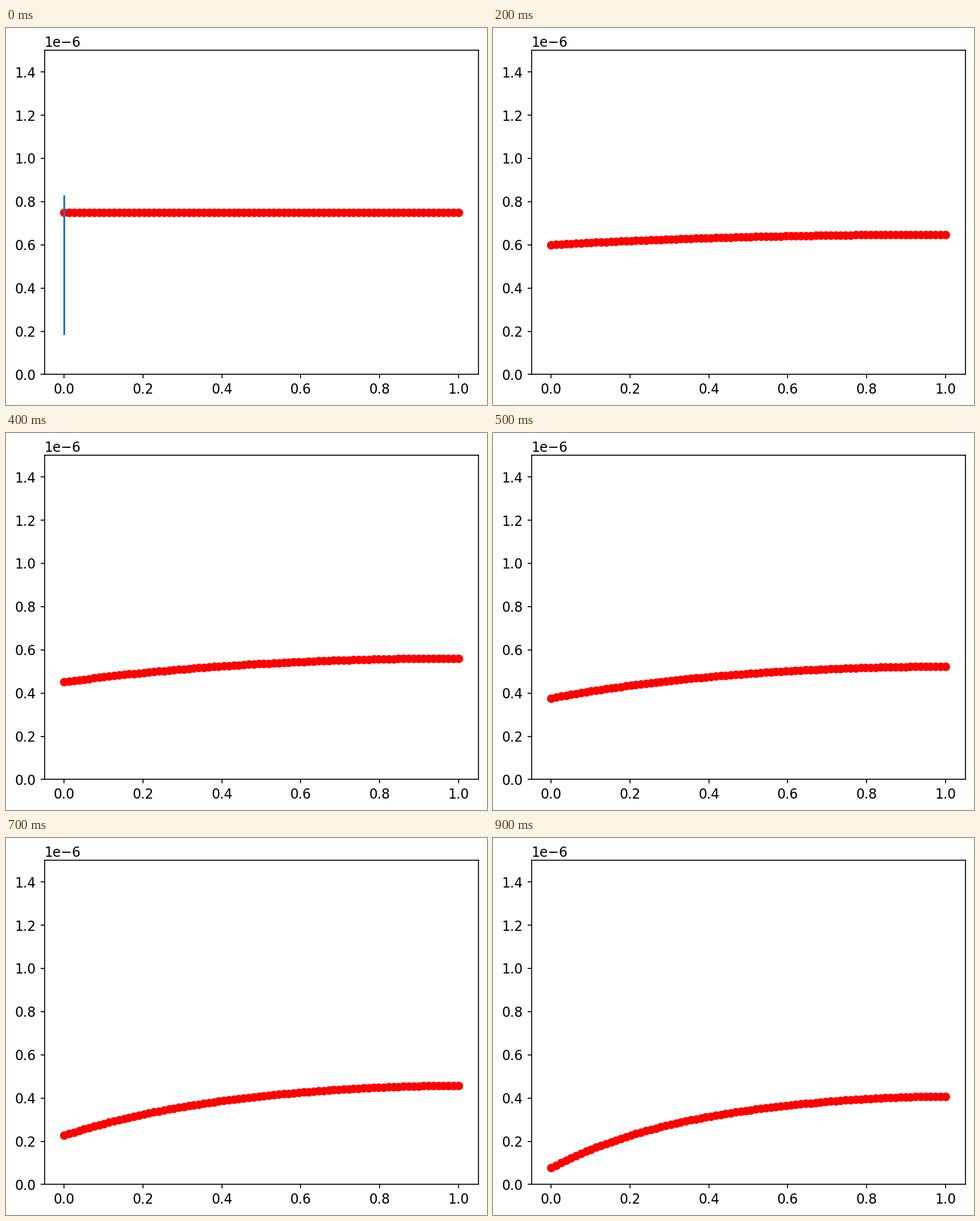
These frames come from a looping animation (846x662 px, 1 s). A matplotlib script:

```python
import numpy as np
import matplotlib.pyplot as plt
from matplotlib.animation import FuncAnimation

WIDTH, HEIGHT, DPI = 846, 662, 154
LEFT, RIGHT, TOP, BOTTOM = 67.5, 830.5, 39.2, 608.5  # axes edges in pixels
FRAMES, INTERVAL = 10, 100
SCALE = 1e-6

plt.rcParams.update({"font.family": "DejaVu Sans", "font.size": 11})

fig = plt.figure(figsize=((WIDTH + 1e-6) / DPI, (HEIGHT + 1e-6) / DPI), dpi=DPI)
ax = fig.add_axes([LEFT / WIDTH, 1 - BOTTOM / HEIGHT,
                   (RIGHT - LEFT) / WIDTH, (BOTTOM - TOP) / HEIGHT])
ax.set_xlim(-0.05, 1.05)
ax.set_ylim(0, 1.5 * SCALE)

x = np.linspace(0, 1, 80)
dots, = ax.plot(x, np.full_like(x, 0.75 * SCALE), "ro")
bar, = ax.plot([0, 0], [0.188 * SCALE, 0.825 * SCALE], color="C0")


def profile(step):
    """Film height: the left end thins steadily, the right end slows down."""
    left = 0.75 - 0.0747 * step
    right = 0.75 - 0.0546 * step + 0.00184 * step**2
    bulge = 0.15 + 0.009 * step**2
    shape = 1 - (1 - x)**2 + bulge * x * (1 - x)**3
    return SCALE * (left + (right - left) * shape)


def update(step):
    dots.set_ydata(profile(step))
    bar.set_visible(step == 0)
    return dots, bar


anim = FuncAnimation(fig, update, frames=FRAMES, interval=INTERVAL,
                     repeat=True, repeat_delay=0)
plt.show()
```
